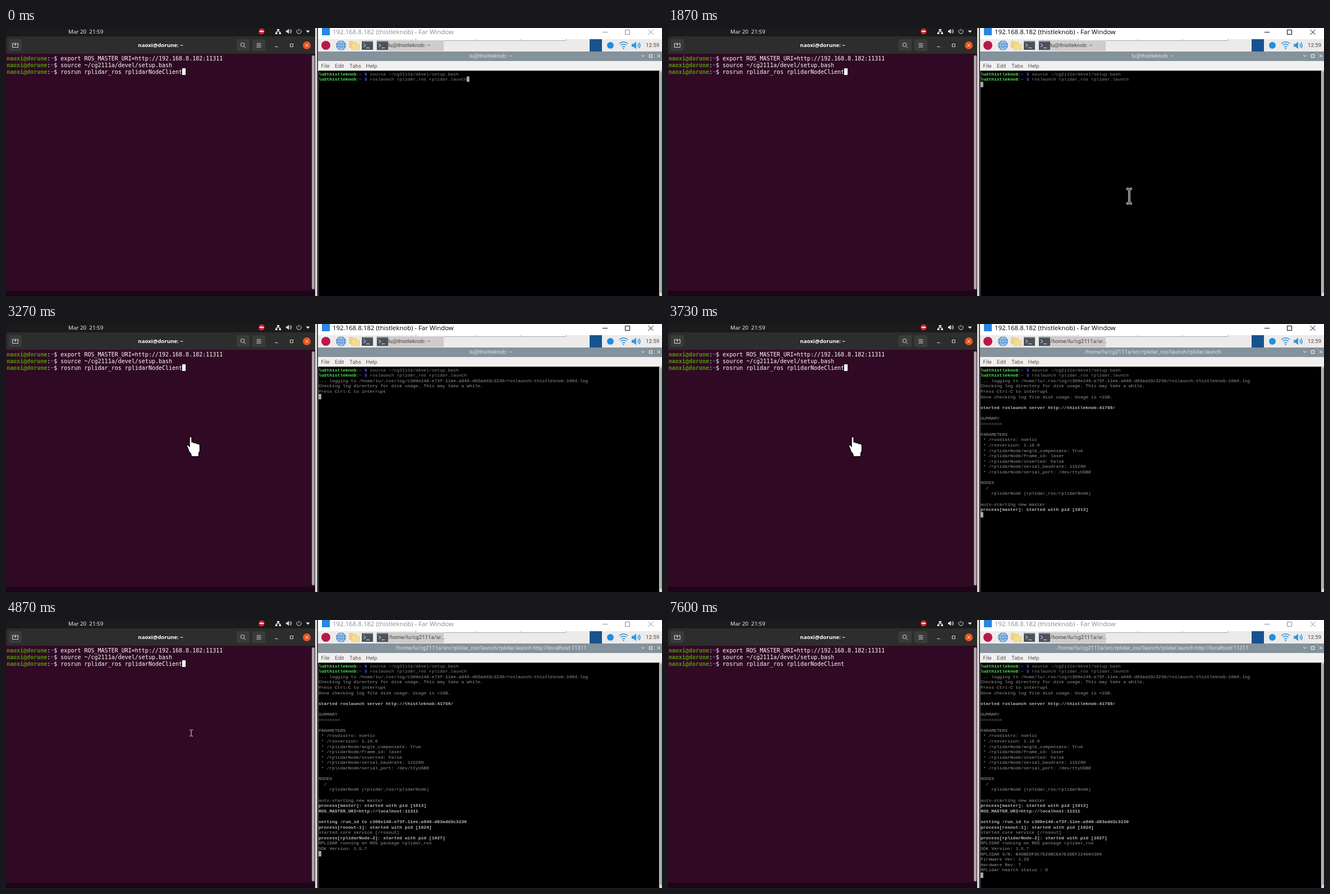
An HTML page that plays this animation: 1169x479 px, repeating every 8 s.

```html
<!DOCTYPE html>
<html lang="en">
<head>
<meta charset="utf-8">
<title>Two terminals</title>
<style>
html, body { margin: 0; width: 100%; height: 100%; overflow: hidden; background: #000; }
svg { display: block; width: 1169px; height: 479px; }
text { white-space: pre; }
.left { font: 10px "DejaVu Sans Mono", monospace; fill: #fff; }
.right { font: 8px "Liberation Mono", monospace; fill: #999; }
.right .b { fill: #bcbcbc; }
.b { font-weight: bold; }
.ui { font: 9.7px Roboto, sans-serif; fill: #555; }
.line { fill: none; stroke-width: 1; }
</style>
</head>
<body>
<svg viewBox="0 0 1169 479">
  <!-- left desktop -->
  <rect width="551" height="479" fill="#1e0418"/>
  <rect width="551" height="46" fill="#1b1b1b"/>
  <path d="M0 46V20Q0 15 5 15H546Q551 15 551 20V46Z" fill="#2d2d2d"/>
  <rect y="46" width="551" height="423.500" fill="#300a24"/>
  <rect x="545" y="49" width="5" height="418" rx="2" fill="#aaa3a7"/>
  <text x="111" y="10" style="font: 9.8px 'Noto Sans', sans-serif" fill="#eee">Mar 20  21:59</text>
  <circle cx="455.500" cy="6" r="5.300" fill="#e0283a"/>
  <rect x="452" y="5" width="7" height="2" fill="#fff"/>
  <g fill="#eee">
    <path d="M483 2h4v3h-4zM480 8h3.500v3H480zM486.500 8h3.500v3h-3.500zM499 4.500h2l3-3v9l-3-3h-2zM534.500 4.500h7L538 8.500z"/>
    <path class="line" stroke="#eee" d="M485 5v1.500M481.700 8V6.500h6.600V8M505.500 3.800q1.800 2.300 0 4.600M507.200 2q3 4 0 8M519.500 3a4 4 0 1 0 5 0M522 1.500v4"/>
  </g>
  <g fill="#3b3b3b">
    <rect x="5" y="20" width="23" height="21" rx="3"/>
    <rect x="411" y="20" width="23" height="21" rx="3"/>
    <rect x="439" y="20" width="23" height="21" rx="3"/>
  </g>
  <path class="line" stroke="#ddd" d="M14 27.500h-2.500v7h10v-7H19M16.500 26v6M13.500 29h6M424.500 33l2.500 2.500M446.500 28h8M446.500 31h8M446.500 34h8M479.500 33.500h5M506.500 28.500h5v5h-5z"/>
  <circle class="line" cx="421.500" cy="30" r="3.300" stroke="#ddd"/>
  <circle cx="536" cy="31" r="7" fill="#e95420"/>
  <path class="line" stroke="#fff" d="M533.500 28.500l5 5m0-5l-5 5"/>
  <text x="275.500" y="34" text-anchor="middle" style="font: bold 9.6px 'Noto Sans', sans-serif" fill="#fff">naoxi@dorune: ~</text>
  <g id="shell" class="left"></g>
  <rect id="block" width="6" height="12" fill="#fff"/>

  <!-- gap between the windows -->
  <rect x="551" width="3" height="479" fill="#e9e9e9"/>
  <rect x="554" width="3" height="479" fill="#4a4a4a"/>

  <!-- remote window -->
  <rect x="556" width="613" height="20" fill="#fff"/>
  <rect x="563" width="14" height="13" fill="#2a86e0"/>
  <g id="caption">
    <text x="582" y="11" style="font: 11.400px 'Open Sans', sans-serif" fill="currentColor">192.168.8.182 (thistleknob) - Far Window</text>
    <path class="line" stroke="currentColor" d="M1063 7.500h9M1103.500 3.500h8v8h-8zM1144.500 3l9 9m0-9l-9 9"/>
  </g>
  <rect x="556" y="20" width="613" height="22" fill="#edebea"/>
  <path d="M731 19h267v3H731z" fill="#fff"/>
  <path class="line" stroke="#aaa" d="M730.500 19v3.500H998V19M837.500 20v2M917.500 20v2"/>
  <circle cx="570" cy="31" r="8" fill="#b8174a"/>
  <circle cx="597" cy="31" r="9" fill="#5a93cf"/>
  <path class="line" stroke="#bcd6ee" d="M588 31h18M597 22v18M590 26h14M590 36h14M597 22q-9 9 0 18q9-9 0-18"/>
  <path d="M611 23h6l2 2h6v11h-14z" fill="#ecd384"/>
  <path d="M616 27h5l2 2h7v10h-14z" fill="#f3dd92" stroke="#dcbf68" stroke-width=".5"/>
  <rect x="660" y="22" width="120" height="19" fill="#cfcccb"/>
  <g id="icon">
    <rect x="634" y="23" width="20" height="16" fill="#4b525c"/>
    <rect x="634" y="23" width="20" height="2" fill="#858e99"/>
    <path class="line" stroke="#e4e8ec" d="M637 28l4 3l-4 3M642 35.500h6"/>
  </g>
  <use href="#icon" x="27"/>
  <text id="task" class="ui" x="681" y="34.200" style="fill: #444"></text>
  <rect x="1040" y="20" width="22" height="22" fill="#17538f"/>
  <circle cx="1077" cy="31" r="6" fill="#1f8fe0"/>
  <g stroke="#2c97e6" fill="none" stroke-width="1.600">
    <path d="M1093 28q7.500-6.500 15 0M1095.500 31q5-4.500 10 0M1098 34q2.500-2 5 0M1126 28q2 3 0 6M1128 26q4 5 0 10"/>
    <path d="M1115 28.500h3l5-4v13l-5-4h-3z" fill="#2c97e6" stroke="none"/>
    <circle cx="1100.500" cy="36.500" r="1.300" fill="#2c97e6" stroke="none"/>
  </g>
  <text class="ui" x="1140" y="34.200" style="fill: #444">12:59</text>
  <rect x="556" y="42" width="613" height="17" fill="#84929c"/>
  <text id="title" class="ui" x="864" y="53.300" text-anchor="middle" style="fill: #dde2e5"></text>
  <path class="line" stroke="#fff" stroke-width="1.400" d="M1132.500 48.500l2.500 2.500l2.500-2.500M1146.500 47.500h5v5h-5zM1161 47.500l5 5m0-5l-5 5"/>
  <rect x="556" y="59" width="613" height="17.500" fill="#f1f0ef"/>
  <g class="ui">
    <text x="561.500" y="71">File</text><text x="586" y="71">Edit</text>
    <text x="612" y="71">Tabs</text><text x="641.500" y="71">Help</text>
  </g>
  <rect x="557" y="76.500" width="608" height="403" fill="#000"/>
  <rect x="1164" y="76.500" width="5" height="403" fill="#d6d6d6"/>
  <rect x="1165.500" y="79" width="3.500" height="394" fill="#a0a4a6"/>
  <g id="log" class="right"></g>
  <rect id="caret" width="4.800" height="9.600" fill="#aaa"/>

  <!-- pointers -->
  <g id="big" fill="none">
    <path id="beam" d="M-5-13h3l2 2l2-2h3M0-11V11M-5 13h3l2-2l2 2h3" stroke="#ccc" stroke-width="3.500"/>
    <use href="#beam" />
    <path d="M-5-13h3l2 2l2-2h3M0-11V11M-5 13h3l2-2l2 2h3" stroke="#222" stroke-width="1.200"/>
  </g>
  <path id="small" class="line" stroke="#eee" stroke-width="1.300" d="M-3-5.500h2l1 1l1-1h2M0-4.500v9M-3 5.500h2l1-1l1 1h2"/>
  <path id="hand" fill="#fff" stroke="#000" stroke-width="1.300" d="M-3 1q0-1.500 2-1.500t2 1.500V9h3l1 1.500h4l1 1.500h4l1.500 3v10l-2 4v6H0v-4l-4-5l-2-6l-2-4q0-2 2-2l3 3z"/>
</svg>
<script>
const LOOP = 8000, ROW = 9.6, CH = 4.8;
const $ = id => document.getElementById(id);

// Lines beginning with "!" are bold.
const OUTPUT = [
  [3270, `... logging to /home/lu/.ros/log/c308e140-e73f-11ee-a940-d83add3c3230/roslaunch-thistleknob-1004.log
Checking log directory for disk usage. This may take a while.
Press Ctrl-C to interrupt`],
  [3330, `Done checking log file disk usage. Usage is <1GB.
`],
  [3730, `!started roslaunch server http://thistleknob:41769/

SUMMARY
========

PARAMETERS
 * /rosdistro: noetic
 * /rosversion: 1.16.0
 * /rplidarNode/angle_compensate: True
 * /rplidarNode/frame_id: laser
 * /rplidarNode/inverted: False
 * /rplidarNode/serial_baudrate: 115200
 * /rplidarNode/serial_port: /dev/ttyUSB0

NODES
  /
    rplidarNode (rplidar_ros/rplidarNode)

auto-starting new master
!process[master]: started with pid [1013]`],
  [4530, `!ROS_MASTER_URI=http://localhost:11311

!setting /run_id to c308e140-e73f-11ee-a940-d83add3c3230`],
  [4600, `!process[rosout-1]: started with pid [1024]`],
  [4730, `started core service [/rosout]
!process[rplidarNode-2]: started with pid [1027]`],
  [4870, `RPLIDAR running on ROS package rplidar_ros
SDK Version: 1.5.7`],
  [7400, `RPLIDAR S/N: B4DBEDF9C7E29BCEA7E39EF224084304
Firmware Ver: 1.29
Hardware Rev: 7
RPLidar health status : 0`]
];

const LAUNCH = "/home/lu/cg2111a/src/rplidar_ros/launch/rplidar.launch";
const TITLES = [
  [0, "lu@thistleknob: ~"],
  [3330, LAUNCH],
  [4530, LAUNCH + " http://localhost:11311"]
];

function addText(parent, x, y, parts) {
  const el = document.createElementNS("http://www.w3.org/2000/svg", "text");
  el.setAttribute("x", x);
  el.setAttribute("y", y);
  for (const [str, color, bold] of parts) {
    const span = document.createElementNS(el.namespaceURI, "tspan");
    span.textContent = str;
    if (color) span.style.fill = color;
    if (bold) span.setAttribute("class", "b");
    el.append(span);
  }
  parent.append(el);
  return el;
}

["export ROS_MASTER_URI=http://192.168.8.182:11311",
 "source ~/cg2111a/devel/setup.bash",
 "rosrun rplidar_ros rplidarNodeClient"].forEach((cmd, i) =>
  addText($("shell"), 1, 57.6 + 12 * i, [
    ["naoxi@dorune", "#4e9a06", true], [":"], ["~", "#3f74b8", true], ["$ " + cmd]
  ]));

const rows = [];
function addRow(time, parts) {
  rows.push({ time, el: addText($("log"), 557, 84.6 + ROW * rows.length, parts) });
}
for (const cmd of ["source ~/cg2111a/devel/setup.bash", "roslaunch rplidar_ros rplidar.launch"])
  addRow(0, [["lu@thistleknob", "#54e854", true], [":"], ["~ $ ", "#5050e8", true], [cmd, "#858585"]]);
for (const [time, block] of OUTPUT)
  for (const line of block.split("\n"))
    addRow(time, [[line.replace(/^!/, ""), null, line[0] === "!"]]);

const place = (el, x, y) => el.setAttribute("transform", `translate(${x} ${y})`);
const show = (el, on) => { el.style.display = on ? "" : "none"; };
const latest = (table, t) => table.filter(row => row[0] <= t).pop();

const ENTRY = [[730, 1154, 314], [800, 1092, 356], [865, 1030, 345], [930, 994, 335]];

function pointer(t) {
  if (t < 730 || t >= 6930) return ["none", 0, 0];
  if (t < 1800) return ["big", ...latest(ENTRY, t).slice(1)];
  if (t >= 4070) return ["small", 330, 202];
  const k = Math.min(1, (Math.floor((t - 1800) / 66) + 1) / 6);
  const e = k * k * (3 - 2 * k);
  const x = 994 - 664 * e;
  return [x < 556 ? "hand" : "big", x, 335 - 133 * e];
}

function render(t) {
  let count = 0;
  for (const row of rows) {
    const on = row.time <= t;
    show(row.el, on);
    count += on;
  }
  if (t < 1400) place($("caret"), 557 + 55 * CH, 77 + ROW);
  else place($("caret"), 557, 77 + ROW * count);

  const title = latest(TITLES, t)[1];
  $("title").textContent = title;
  $("task").textContent = title.length > 20 ? title.slice(0, 19) + "..." : title;
  $("caption").style.color = t >= 1070 && t < 4070 ? "#000" : "#8c8c8c";

  show($("block"), t < 6930 || t >= 7000 && t < 7600);
  if (t < 6930) place($("block"), 314, 72);
  else place($("block"), 1, 84);

  const [kind, x, y] = pointer(t);
  for (const id of ["big", "small", "hand"]) {
    show($(id), id === kind);
    place($(id), x, y);
  }
}

function tick() {
  render(performance.now() % LOOP);
  requestAnimationFrame(tick);
}
render(0);
tick();
</script>
</body>
</html>
```
